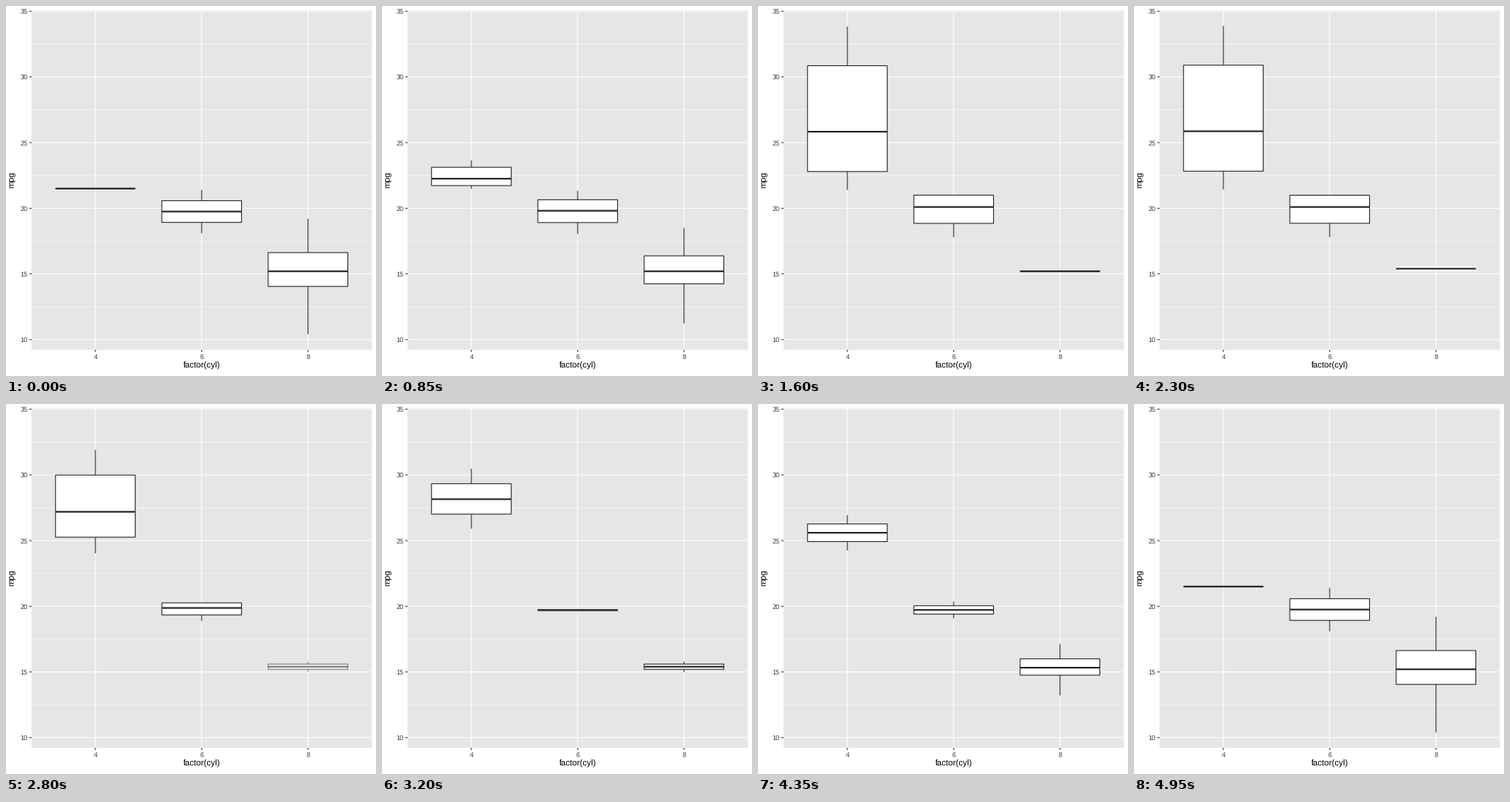
Write a matplotlib script that moves like this. It is 480 by 480 pixels and loops after 5 s.

```python
import numpy as np
import matplotlib.pyplot as plt
from matplotlib.animation import FuncAnimation
from matplotlib.colors import to_rgba
from matplotlib.patches import Rectangle

plt.rcParams["font.family"] = "Liberation Sans"
plt.rcParams["text.hinting"] = "none"

SIZE, FRAMES, STEP = 480, 100, 50
LEFT, RIGHT, TOP, BOTTOM = 33.2, 474.5, 5.5, 446.0
Y_MIN, Y_MAX = 9.225, 35.075
UNIT = (RIGHT - LEFT) / 3.2
HALF = 0.375 * UNIT
THIN, THICK = 1.07, 2.13
PANEL, INK, LABEL = "#e6e6e6", "#262626", "#3c3c3c"

# Per state: mpg values for 4, 6 and 8 cylinders
STATES = [
    ([21.5],
     [21.4, 18.1],
     [18.7, 14.3, 16.4, 17.3, 15.2, 10.4, 10.4, 14.7, 15.5, 15.2, 13.3, 19.2]),
    ([22.8, 24.4, 22.8, 32.4, 30.4, 33.9, 27.3, 21.4],
     [21, 21, 19.2, 17.8],
     None),
    ([26, 30.4], [19.7], [15.8, 15]),
]

# Timeline: frames and the state reached there
KEYS = [0, 11, 33, 45, 46, 47, 66, 78, 99]
PHASE = [0, 0, 1, 1, 1 + 1 / 22, 1 + 3 / 22, 2, 2, 3]


def px(slot):
    return LEFT + (slot + 0.6) * UNIT


def py(value):
    return BOTTOM - (value - Y_MIN) / (Y_MAX - Y_MIN) * (BOTTOM - TOP)


def five_numbers(values):
    return None if values is None else np.percentile(values, [0, 25, 50, 75, 100])


SUMMARY = [[five_numbers(v) for v in state] for state in STATES]

fig = plt.figure(figsize=(SIZE / 72, SIZE / 72), dpi=72, facecolor="white")
ax = fig.add_axes([0, 0, 1, 1])
ax.set_xlim(0, SIZE)
ax.set_ylim(SIZE, 0)
ax.axis("off")


def line(xs, ys, color, width, z):
    return ax.plot(xs, ys, color=color, lw=width, zorder=z, snap=False,
                   solid_capstyle="butt")[0]


def draw_panel():
    ax.add_patch(Rectangle((LEFT, TOP), RIGHT - LEFT, BOTTOM - TOP,
                           fc=PANEL, ec="none", zorder=0, snap=False))
    for value in np.arange(12.5, 35, 5):
        line([LEFT, RIGHT], [py(value)] * 2, "white", THIN / 2, 1)
    for value in range(10, 36, 5):
        y = py(value)
        line([LEFT, RIGHT], [y, y], "white", THIN, 1)
        line([LEFT - 2.75, LEFT], [y, y], INK, THIN, 1)
        ax.text(28.3, y + 3.3, str(value), size=8.8, color=LABEL,
                ha="right", va="baseline")
    for slot, name in enumerate("468"):
        x = px(slot)
        line([x, x], [TOP, BOTTOM], "white", THIN, 1)
        line([x, x], [BOTTOM, BOTTOM + 2.75], INK, THIN, 1)
        ax.text(x, 458, name, size=8.8, color=LABEL, ha="center", va="baseline")
    ax.text((LEFT + RIGHT) / 2, 470, "factor(cyl)", size=11, color="black",
            ha="center", va="baseline")
    ax.text(11, (TOP + BOTTOM) / 2, "mpg", size=11, color="black", rotation=90,
            ha="right", va="center", rotation_mode="default").set(
                ha="left", va="baseline", rotation_mode="anchor",
                x=11, y=(TOP + BOTTOM) / 2 + 10.7)


class Box:
    def __init__(self, slot):
        x = px(slot)
        span = [x - HALF, x + HALF]
        self.whiskers = [line([x, x], [0, 0], INK, THIN, 2) for _ in range(2)]
        self.body = Rectangle((span[0], 0), 2 * HALF, 0, lw=THIN, zorder=3,
                              joinstyle="miter", snap=False)
        ax.add_patch(self.body)
        self.median = line(span, [0, 0], INK, THICK, 4)
        self.parts = self.whiskers + [self.body, self.median]

    def show(self, stats, alpha):
        for part in self.parts:
            part.set_visible(stats is not None)
        if stats is None:
            return
        low, q1, mid, q3, high = py(stats)
        self.whiskers[0].set_ydata([q3, high])
        self.whiskers[1].set_ydata([q1, low])
        self.body.set_y(q3)
        self.body.set_height(q1 - q3)
        self.median.set_ydata([mid, mid])
        # The faintest step shows fill and median at full strength
        inner = 1 if alpha < 0.01 else alpha
        self.body.set_facecolor(to_rgba("white", inner))
        self.body.set_edgecolor(to_rgba(INK, alpha))
        self.median.set_alpha(inner)
        for whisker in self.whiskers:
            whisker.set_alpha(alpha)


def tween(start, end, t):
    """Stats and alpha between two states: fade to enter, shrink to exit."""
    if t == 0:
        return start, 1
    if start is None:
        return end, t
    if end is None:
        return (None if t == 1 else start + (start[2] - start) * t), 1
    return start + (end - start) * t, 1


draw_panel()
boxes = [Box(slot) for slot in range(3)]


def update(frame):
    phase = np.interp(frame, KEYS, PHASE)
    state = min(int(np.ceil(phase)) - 1, 2) if phase > 0 else 0
    t = 0.5 - 0.5 * np.cos(np.pi * (phase - state))
    pairs = zip(SUMMARY[state], SUMMARY[(state + 1) % 3])
    for box, (start, end) in zip(boxes, pairs):
        box.show(*tween(start, end, t))
    return []


anim = FuncAnimation(fig, update, frames=FRAMES, interval=STEP,
                     init_func=lambda: update(0), repeat=True, repeat_delay=0)
plt.show()
```
